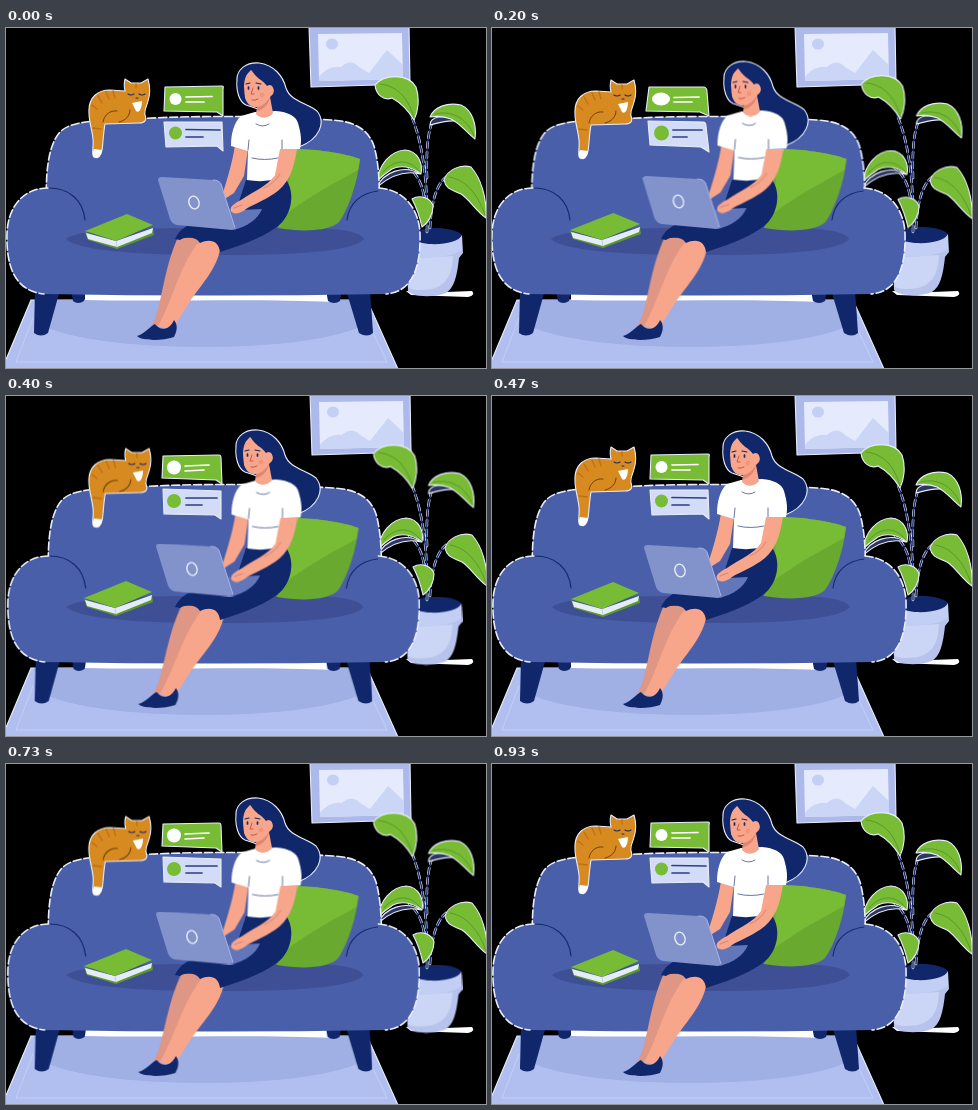
An HTML page that plays this animation: 480 px wide and 340 px high, repeating every 0.99 s.

```html
<!DOCTYPE html>
<html lang="en">
<head>
<meta charset="utf-8">
<title>Working from the sofa</title>
<style>
html, body { margin: 0; width: 100%; height: 100%; overflow: hidden; background: #000; }
svg { display: block; width: 480px; height: 340px; }
path { stroke-linejoin: round; stroke-linecap: round; }

/* Three hand-drawn poses, a, b and c, held in turn. */
.m { animation: boil 990ms step-end infinite; }
.v { animation: swap 990ms step-end infinite; }
@keyframes boil {
  0%, 47.47%, 93.94% { transform: var(--a, none); }
  7.07%, 60.61% { transform: var(--b, none); }
  27.27%, 73.74% { transform: var(--c, none); }
}
@keyframes swap {
  0%, 47.47%, 93.94% { opacity: var(--a, 0); }
  7.07%, 60.61% { opacity: var(--b, 0); }
  27.27%, 73.74% { opacity: var(--c, 0); }
}

.back { --b: translate(-.5px, 0); --c: translate(2px, 0); }
.seat { transform-origin: 207px 200px; --b: translate(-1px, 0); --c: scaleX(.996); }
.cat { transform-origin: 112px 90px; --b: translate(0, 1px); --c: translate(.5px, 1.5px) scaleX(1.02); }
.frame { --c: translate(1px, 0); }
.book { transform-origin: 113px 204px; --b: scaleX(1.03) translate(0, -1px); --c: translate(-1px, -1px); }
.lap { --b: translate(-1.5px, -1px); --c: translate(-2px, -1.5px); }
.head { --b: translate(1px, -1.5px); --c: translate(-1px, -1px); }
.torso { --b: translate(.5px, -.5px); --c: translate(.5px, .5px); }
.legs { transform-origin: 150px 305px; --b: skewX(-.4deg); --c: translate(1.5px, 0) skewX(-1.3deg); }
.pillow { --b: translate(.5px, 0); --c: translate(-1.5px, 1px); }
.leaf { --b: translate(.5px, -1px); --c: translate(-1.5px, .5px); }
.low { --b: translate(0, .5px); --c: translate(1px, 0); }
.pot { --b: translate(0, -1px); --c: translate(-.5px, .5px); }

.halo { stroke: #e9edfb; stroke-width: 1.1; }
.edge { stroke: #e9edfb; stroke-width: 1.6; stroke-dasharray: 8 3; }
.blue { fill: #4a5fa9; }
.navy { fill: #10276b; }
.skin { fill: #f7a58b; }
.green { fill: #78bb35; }
.white { fill: #fff; }
.line { fill: none; stroke: #14296b; stroke-width: 1.1; }
.vein { fill: none; stroke: #5a9a2b; stroke-width: 1; }
.dash { fill: none; stroke-width: 1.7; }
</style>
</head>
<body>
<svg viewBox="0 0 480 340" role="img" aria-label="Woman with a laptop on a sofa">
  <rect width="480" height="340"/>

  <!-- picture -->
  <g class="m frame">
    <path class="halo" fill="#acb9ea" d="M303 -2H403L404 56L305 59Z"/>
    <path fill="#e5ebfc" d="M312 6L396 5L397 51L313 53Z"/>
    <path fill="#cbd6f6" d="M313 49C320 40 328 38 335 39C341 33 348 33 353 39L363 45L381 22L397 37V51L313 53Z"/>
    <ellipse cx="326" cy="16" rx="6" ry="5.5" fill="#c3cff4"/>
  </g>

  <!-- rug -->
  <path class="halo" fill="#b1bff0" d="M25 272H361L392 341H-4Z"/>
  <path fill="#a0afe4" d="M28 272H361L366 290C350 310 270 319 200 319C120 319 60 310 36 297Z"/>
  <path fill="none" stroke="#c8d2f6" stroke-width=".8" d="M27 290L10 334H381L364 298"/>
  <path class="white" d="M79 265H322L327 274C250 270 150 274 79 272Z"/>

  <!-- plant -->
  <path class="white" d="M400 263L440 264L466 263Q470 267 462 269L405 267Z"/>
  <g class="m pot">
    <path fill="#b7c3ec" d="M400 205L456 207L457 225L453 230C451 249 448 260 440 265C426 270 407 269 402 263Z"/>
    <path fill="#cbd5f5" d="M411 230L447 228C446 248 440 257 426 261C411 263 405 262 402 259Z"/>
    <path fill="#c3cef4" d="M402 206L456 208L456 222C445 229 425 231 408 229Z"/>
    <path class="navy" d="M407 206C414 198 447 198 456 207C452 217 420 219 407 212Z"/>
  </g>
  <g fill="none">
    <path id="stems" stroke="#e9edfb" stroke-width="2.6" stroke-dasharray="6 4" d="M421 204C422 155 417 115 405 87M421 150C420 122 422 103 427 92M424 200C425 176 430 157 440 149M419 178C418 160 413 148 403 140"/>
    <path stroke="#14296b" stroke-width="1.5" d="M421 204C422 155 417 115 405 87M421 150C420 122 422 103 427 92M424 200C425 176 430 157 440 149M419 178C418 160 413 148 403 140"/>
  </g>
  <g class="m leaf">
    <path class="green halo" d="M369 57C378 46 402 45 410 59C414 71 412 84 408 92C402 82 395 75 386 70C378 73 370 67 369 57Z"/>
    <path class="vein" d="M374 56C393 58 403 72 408 90"/>
    <path fill="#2b3760" class="halo" d="M424 97C424 89 438 85 450 93C440 92 432 95 424 97Z"/>
    <path class="green halo" d="M424 89C428 79 441 74 455 77C466 82 471 96 469 111C461 105 455 96 445 91C438 88 430 88 424 89Z"/>
    <path class="vein" d="M429 86C449 81 463 94 468 108"/>
  </g>
  <g class="m low">
    <path fill="#2b3760" class="halo" d="M371 159C378 144 398 136 414 146C399 142 385 147 371 159Z"/>
    <path class="green halo" d="M371 153C373 137 384 123 399 122C412 123 417 135 415 146C405 138 394 137 386 141C380 145 375 149 371 153Z"/>
    <path class="vein" d="M377 144C388 131 403 130 414 144"/>
    <path class="green halo" d="M438 152C441 142 454 136 465 139C475 150 481 170 480 190C470 183 464 172 455 166C447 162 440 162 438 152Z"/>
    <path class="vein" d="M443 149C463 152 474 172 479 187"/>
    <path class="green halo" d="M406 171C414 166 425 170 427 178C427 187 422 195 416 199C414 190 412 182 406 171Z"/>
  </g>

  <!-- sofa legs -->
  <g class="m seat navy">
    <path d="M29 262H54L42 305Q35 310 28 305Z"/>
    <path d="M340 262H364L367 305Q361 310 353 305Z"/>
    <path d="M65 262H80L78 273Q72 277 67 273Z"/>
    <path d="M320 262H336L334 273Q328 277 322 273Z"/>
  </g>

  <!-- sofa -->
  <path class="blue edge m back" d="M43 220C39 170 37 123 54 104C65 93 88 93 112 92Q210 85 325 92C350 93 363 103 368 118C373 136 375 158 372 220Z"/>
  <g class="m seat">
    <path class="blue" d="M42 160C63 160 78 171 80 190V202H340V192C343 173 356 163 373 160C400 162 413 183 414 205C415 240 406 264 380 266Q207 269 38 266C9 263 0 239 1 205C2 179 17 160 42 160Z"/>
    <path style="fill:none" class="edge" d="M42 160C17 160 2 179 1 205C0 239 9 263 38 266M373 160C400 162 413 183 414 205C415 240 406 264 380 266"/>
    <path fill="#3f4f95" d="M60 211C70 202 120 200 200 200H300C340 200 355 205 358 211C350 222 300 228 200 227C130 227 70 222 60 211Z"/>
    <path class="line" d="M43 160C63 160 77 172 79 192M341 192C343 175 355 165 372 163"/>
  </g>

  <!-- pillow -->
  <g class="m pillow">
    <path fill="#69a930" d="M286 121C310 121 338 125 354 131C352 152 343 180 333 194C325 202 300 205 272 200Z"/>
    <path class="green" d="M286 121C310 121 338 125 354 131L352 142C330 154 307 166 280 186Z"/>
  </g>

  <!-- cat -->
  <g class="m cat">
    <path fill="#d68a1f" class="halo" d="M119 51L125 55H135L142 51C144 58 144 67 142 73C141 78 138 81 139 87C141 92 139 95 133 95L99 96C97 107 97 117 96 122C95 128 92 131 88 129C85 127 88 119 87 111C86 101 83 94 83 85C82 69 92 62 104 62L119 63C118 59 118 55 119 51Z"/>
    <path class="white" d="M88 121L96 122C95 128 92 131 88 129C86 127 87 123 88 121Z"/>
    <path class="white" d="M126 75L136 73C136 80 133 86 130 83Z"/>
    <path fill="none" stroke="#bd7015" stroke-width="1.3" d="M100 64L103 71M107 63L109 70M92 68L96 75M86 77L91 81M87 100L95 101M130 56V60"/>
    <path fill="none" stroke="#70400c" d="M97 94C98 87 104 82 111 83M113 94C119 93 124 88 124 82"/>
    <path class="line" d="M122 66Q125 68 128 66M133 66Q136 68 139 66M130 70H132"/>
  </g>

  <!-- chat bubbles -->
  <g class="v" style="--a:1">
    <path class="green halo" d="M159 59L216 58Q218 58 217 61V88L211 84L158 83Z"/>
    <circle class="white" cx="169.500" cy="71" r="6"/>
    <path class="dash" stroke="#fff" d="M180 69L206 68.500M180 74L198 74"/>
    <path class="halo" fill="#d3dcf7" d="M158 94L216 94L217 123L211 118L160 119Z"/>
    <circle class="green" cx="169.500" cy="105" r="6.500"/>
    <path class="dash" stroke="#2d3f87" d="M180 101.500L214 102M180 109L197 109"/>
  </g>
  <g class="v" style="--b:1">
    <path class="green halo" d="M157 59L211 59Q215 59 215 64L217 88L208 84L154 83Z"/>
    <ellipse class="white" cx="169" cy="71" rx="9" ry="6.500"/>
    <path class="dash" stroke="#fff" d="M182 69.500L207 69M182 74L200 74"/>
    <path class="halo" fill="#d3dcf7" d="M156 93L211 94Q214 94 214 98L217 124L209 119L158 117Z"/>
    <circle class="green" cx="169.500" cy="105" r="7.500"/>
    <path class="dash" stroke="#2d3f87" d="M181 102L210 102M181 109L195 109"/>
  </g>
  <g class="v" style="--c:1">
    <path class="green halo" d="M157 60L213 59Q215 59 215 62L216 88L210 84L156 82Z"/>
    <circle class="white" cx="168" cy="71.500" r="7"/>
    <path class="dash" stroke="#fff" d="M179 70L203 69M179 75L198 74"/>
    <path class="halo" fill="#d3dcf7" d="M157 93L215 95V123L209 119L158 118Z"/>
    <circle class="green" cx="168" cy="105" r="7"/>
    <path class="dash" stroke="#2d3f87" d="M180 102L211 102M180 109L196 109"/>
  </g>

  <!-- book -->
  <g class="m book">
    <path fill="#5a9a2b" d="M79 204L82 212L111 221L148 207L147 200L110 214Z"/>
    <path fill="#e6ebf8" d="M80 205L110 213L147 200L146 205L111 219L82 211Z"/>
    <path class="green" d="M79 203L121 186L147 197L110 213Z"/>
    <path fill="none" stroke="#b9c4e6" stroke-width=".8" d="M110 213L111 219"/>
  </g>

  <!-- woman -->
  <g class="m legs">
    <path fill="#e09684" d="M172 209L198 211C195 228 184 245 175 262L158 299L146 297C156 280 156 245 172 209Z"/>
    <path class="skin" d="M191 216C203 207 213 211 214 222C210 243 192 260 181 278L166 302L152 298C166 274 173 240 191 216Z"/>
    <path class="navy" d="M131 308C139 306 144 298 149 296C154 303 163 303 168 292C173 298 170 305 168 309C156 313 136 313 131 308Z"/>
  </g>
  <g class="m head">
    <path class="navy halo" d="M231 53C230 41 241 34 253 35C268 37 277 48 280 60C284 73 301 75 311 83C320 94 314 111 293 119C275 114 262 97 258 83L240 77C233 74 230 62 231 53Z"/>
  </g>
  <path class="navy" d="M240 152L278 149C290 162 287 187 271 199C252 212 235 217 214 224C213 213 204 210 194 215C190 209 181 208 174 212L169 211C173 202 180 197 190 195L225 198Z"/>
  <g class="m torso">
    <path class="skin" d="M229 117L242 121L238 148L228 165L214 174C220 155 226 137 229 117Z"/>
    <path class="white" d="M249 84L270 83C282 84 290 88 292 95C295 105 296 113 294 121L276 122L277 150Q258 155 241 152L242 123L225 118C225 106 228 94 235 88Z"/>
    <path fill="none" stroke="#5b6690" stroke-width=".9" d="M242 122L243 112M276 122L276 112M246 130Q258 133 272 130M250 96Q257 100 263 96"/>
  </g>
  <g class="m head">
    <path class="skin" d="M245 42C253 47 258 52 262 57C267 55 270 60 267 66L264 69L267 85C263 91 254 91 250 86L251 79C241 80 237 70 236 51Z"/>
    <path fill="#df8573" d="M251 79C257 78 261 74 264 69C263 76 257 82 251 83Z"/>
    <path class="navy" d="M245 41C240 46 238 52 238 59L239 72C233 68 231 59 232 53C233 44 238 39 245 38Z"/>
    <path class="navy" d="M245 41C249 50 257 52 261 58C265 55 268 59 268 64L277 62C274 49 265 38 252 37Z"/>
    <path class="line" d="M240 56L244 55M250 55L255 56"/>
    <path class="line" d="M242.500 59V61M252.500 59V61" style="stroke-width:1.7"/>
    <path fill="none" stroke="#c9574f" stroke-width="1" d="M247 60L245 66L248 66M246 72Q249 73 252 71"/>
    <circle cx="256" cy="67" r="2.300" fill="#f3937e"/>
  </g>

  <!-- laptop and front arm -->
  <g class="m lap">
    <path fill="#6376b9" d="M213 183L256 181C252 191 242 198 228 202L206 198Z"/>
    <path fill="#8293cc" d="M152 152Q152 149 156 149L207 152Q213 152 215 156L229 200L226 202L171 197Q166 196 164 191Z"/>
    <path fill="none" stroke="#a7b5e4" d="M207 152Q213 152 215 156L229 200"/>
    <ellipse cx="188" cy="174.500" rx="5" ry="6.500" transform="rotate(-18 188 174.500)" fill="none" stroke="#e8edfc" stroke-width="1.400"/>
  </g>
  <g class="m torso">
    <path class="skin" d="M274 121L291 121C288 140 284 152 273 162C262 171 248 176 240 181C234 186 227 187 225 183C223 179 229 175 235 172C248 163 262 158 269 147Z"/>
    <path fill="none" stroke="#d98372" d="M228 180L236 177M274 146Q268 156 258 160"/>
  </g>
</svg>
</body>
</html>
```
